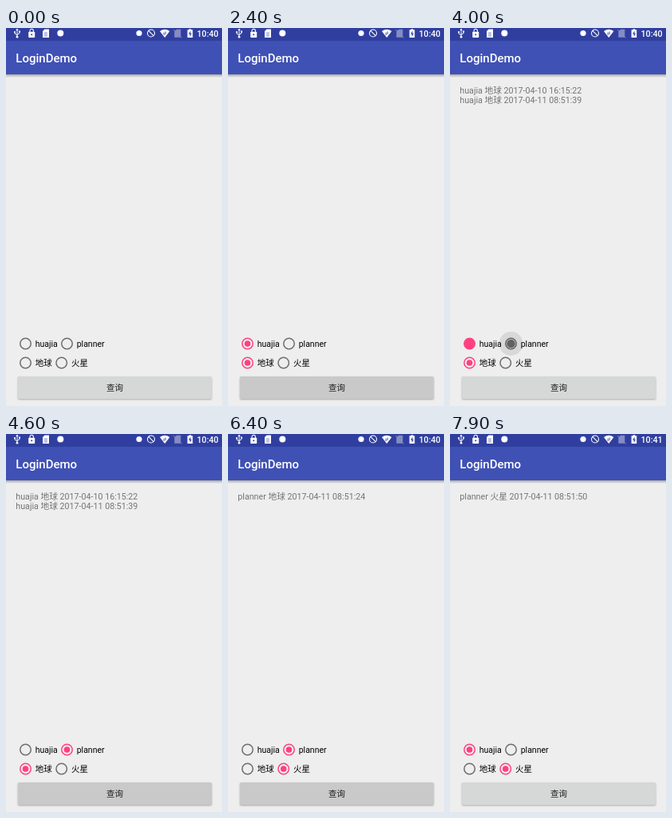
Recreate the animation shown at these times as an HTML page. Size 271x473 px, loop 8000 ms.

```html
<!DOCTYPE html>
<html lang="zh-CN">
<head>
<meta charset="utf-8">
<title>LoginDemo</title>
<style>
html, body { margin: 0; width: 100%; height: 100%; overflow: hidden; background: #eee; }
svg { display: block; width: 271px; height: 473px; }
text { font: 10.5px Roboto, "Noto Sans CJK SC", "Noto Sans CJK", sans-serif; white-space: pre; }
.title { font-size: 15px; font-weight: 500; fill: #fff; }
.clock { font-size: 10.7px; font-weight: 500; fill: #fff; }
.result { font-size: 10.7px; fill: #747474; }
.action { font-weight: 500; fill: #1c1c1c; }
</style>
</head>
<body>
<svg viewBox="0 0 271 473">
  <defs>
    <linearGradient id="shade" x2="0" y2="1">
      <stop offset="0" stop-color="#000" stop-opacity=".3"/>
      <stop offset="1" stop-color="#000" stop-opacity="0"/>
    </linearGradient>
    <filter id="blur" x="-5%" y="-20%" width="110%" height="150%">
      <feGaussianBlur stdDeviation=".8"/>
    </filter>
  </defs>
  <rect width="271" height="473" fill="#eee"/>
  <rect width="271" height="16" fill="#303f9f"/>
  <rect y="16" width="271" height="42" fill="#3f51b5"/>
  <rect y="58" width="271" height="4" fill="url(#shade)"/>

  <g fill="#fff">
    <!-- usb -->
    <path d="M14 2V11M11 5V7L14 9M17 4.5V6.5L14 8.5" fill="none" stroke="#fff"/>
    <path d="M14 .5L15.7 3H12.3ZM16 3.5h2v2h-2z"/>
    <circle cx="11" cy="5" r="1.1"/><circle cx="14" cy="11.2" r="1.4"/>
    <!-- lock -->
    <path d="M30 5V3.5a2.2 2.2 0 0 1 4.4 0V5" fill="none" stroke="#fff" stroke-width="1.1"/>
    <rect x="28.2" y="4.7" width="8" height="7.3" rx=".8"/>
    <circle cx="32.2" cy="8.3" r="1" fill="#303f9f"/>
    <!-- card -->
    <path d="M48.5 1.5H54V12H46V4Z"/>
    <path d="M48 6h4M48 8h4M48 10h4" stroke="#303f9f" stroke-width=".6"/>
    <circle cx="68.3" cy="6.5" r="4"/>
    <circle cx="167" cy="6.5" r="3.6"/>
    <!-- blocked -->
    <path d="M178.9 3.4L185.1 9.6" stroke="#fff" stroke-width="1.1"/>
    <circle cx="182" cy="6.5" r="4.5" fill="none" stroke="#fff" stroke-width="1.1"/>
    <!-- wifi -->
    <path d="M193 4Q199.2 -.5 205.4 4L199.2 12Z"/>
    <path id="wifi" d="M198.2 9V5.5M200.2 4.5V8" stroke="#303f9f" stroke-width=".9"/>
    <!-- no sim -->
    <g opacity=".4">
      <path d="M214 1.8H219.3V11.7H211.3V4.5Z"/>
      <path d="M210 2L220.5 12.3" stroke="#fff"/>
    </g>
    <!-- battery -->
    <path d="M229.6 1.2h2.6v1h2V12h-6.6V2.2h2z"/>
    <path d="M231.6 3.5L229 7.6h1.7V11L233 6.7h-1.6Z" fill="#303f9f"/>
  </g>
  <text id="clock" class="clock" x="239.5" y="11"></text>
  <text class="title" x="12.3" y="43">LoginDemo</text>
  <text id="line0" class="result" x="12.3" y="81.5"></text>
  <text id="line1" class="result" x="12.3" y="94.2"></text>

  <g id="radios"></g>

  <rect id="lift" x="15" y="437" width="243" height="28" rx="1.5" fill="#000" filter="url(#blur)"/>
  <rect id="button" x="15" y="436" width="243" height="28" rx="1.5"/>
  <text class="action" x="136.5" y="453.7" text-anchor="middle">查询</text>
</svg>
<script>
const LOOP = 8000;
const GREY = '#6e6e6e', DARK = '#626262', PINK = '#ff4081';
const $ = id => document.getElementById(id);

// mode: [colour, ring width, dot radius]
const MODES = {
  off: [GREY, 1.5, 0],
  on: [PINK, 1.5, 3.8],
  thick: [DARK, 3.8, 0],
  dot: [DARK, 1.5, 5.3],
  big: [PINK, 1.5, 4.4],
  full: [PINK, 1.5, 6.5],
  fade: [GREY, 2.4, 0]
};

// steps: [time, mode, ripple radius]
const RADIOS = [
  { x: 24.5, y: 395, label: 'huajia', steps: [
    [0, 'off', 0], [1000, 'thick', 13], [1100, 'dot', 16], [1200, 'on', 0],
    [4000, 'full', 0], [4100, 'off', 0],
    [7300, 'thick', 13], [7400, 'dot', 14.5], [7500, 'on', 0]] },
  { x: 76.5, y: 395, label: 'planner', steps: [
    [0, 'off', 0], [3900, 'thick', 13], [4000, 'dot', 15], [4100, 'on', 0],
    [7400, 'full', 0], [7500, 'off', 0]] },
  { x: 24.5, y: 419, label: '地球', steps: [
    [0, 'off', 0], [1400, 'thick', 13], [1500, 'dot', 16], [1600, 'big', 0], [1800, 'on', 0],
    [5800, 'full', 0], [5900, 'fade', 0], [6000, 'off', 0]] },
  { x: 69.7, y: 419, label: '火星', steps: [
    [0, 'off', 0], [5800, 'dot', 14.5], [5900, 'big', 15], [6000, 'on', 0]] }
];

const RESULTS = [
  [0, '', ''],
  [2500, 'huajia 地球 2017-04-10 16:15:22', 'huajia 地球 2017-04-11 08:51:39'],
  [4700, 'planner 地球 2017-04-11 08:51:24', ''],
  [6500, 'planner 火星 2017-04-11 08:51:50', '']
];

// [time, fill, shadow opacity]
const IDLE = ['#d6d7d7', .28], HALF = ['#cfcfcf', .3], DOWN = ['#c9c9c9', .3];
const BUTTON = [
  [0, ...IDLE],
  [2300, ...HALF], [2400, ...DOWN], [2500, ...HALF], [2600, ...IDLE],
  [4500, ...HALF], [4600, ...DOWN], [4700, ...IDLE],
  [6300, ...HALF], [6400, ...DOWN], [6500, ...IDLE]
];
const WIFI = [[0, 1], [3200, 0], [3900, 1], [5000, 0], [5800, 1], [6700, 0], [7700, 1]];
const CLOCK = [[0, '10:40'], [7900, '10:41']];

const at = (steps, t) => steps.findLast(s => s[0] <= t).slice(1);

function add(tag, attrs) {
  const el = document.createElementNS('http://www.w3.org/2000/svg', tag);
  set(el, attrs);
  return $('radios').appendChild(el);
}

function set(el, attrs) {
  for (const k in attrs) el.setAttribute(k, attrs[k]);
}

for (const r of RADIOS) {
  const c = { cx: r.x, cy: r.y };
  r.ripple = add('circle', { ...c, fill: '#000', opacity: .09 });
  r.ring = add('circle', { ...c, fill: 'none' });
  r.dot = add('circle', c);
  add('text', { x: r.x + 12.2, y: r.y + 4 }).textContent = r.label;
}

function draw(t) {
  for (const r of RADIOS) {
    const [mode, ripple] = at(r.steps, t);
    const [color, width, dot] = MODES[mode];
    set(r.ripple, { r: ripple });
    set(r.ring, { r: 7.5 - width / 2, stroke: color, 'stroke-width': width });
    set(r.dot, { r: dot, fill: color });
  }
  at(RESULTS, t).forEach((s, i) => { $('line' + i).textContent = s; });
  const [fill, shadow] = at(BUTTON, t);
  set($('button'), { fill });
  set($('lift'), { opacity: shadow });
  set($('wifi'), { opacity: at(WIFI, t)[0] });
  $('clock').textContent = at(CLOCK, t)[0];
}

const start = performance.now();
function tick() {
  draw((performance.now() - start) % LOOP);
  requestAnimationFrame(tick);
}
tick();
</script>
</body>
</html>
```
